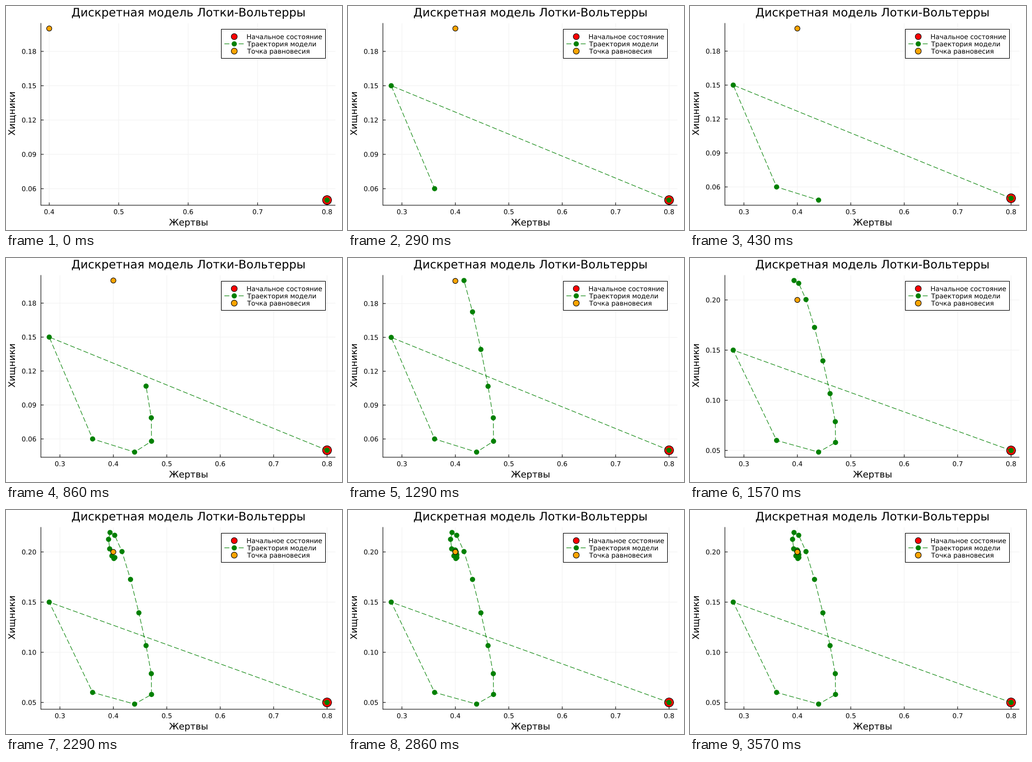
Recreate the animation shown at these times as a matplotlib script. Size 600 px wide and 400 px high, loop 8 s.

```python
import numpy as np
import matplotlib.pyplot as plt
from matplotlib.animation import FuncAnimation
from matplotlib.patches import Circle, PathPatch, Rectangle
from matplotlib.textpath import TextPath
from matplotlib.transforms import Affine2D

W, H, DPI = 600, 400, 100
PX = 72 / DPI                      # one pixel in points
LEFT, RIGHT, TOP, BOTTOM = 62.3, 588.2, 31.0, 355.8
MID = (LEFT + RIGHT) / 2
SMALL, MEDIUM, LARGE = 11.85, 16.3, 20.74
STEPS, INTERVAL, LOOP = 25, 20, 8000
A, B, C, D = 2, 1, 1, 5            # growth, predation, decline, feeding
REST = (0.4, 0.2)                  # equilibrium
GRID = '#f2f2f2'

fig = plt.figure(figsize=(W / DPI, H / DPI), dpi=DPI, facecolor='white')
ax = fig.add_axes([0, 0, 1, 1])
ax.set_xlim(0, W)
ax.set_ylim(H, 0)
ax.axis('off')


def line(xs, ys, color='black', z=1, dashed=False):
    style = (0, (8.8, 4)) if dashed else '-'
    return ax.plot(xs, ys, color=color, lw=PX, ls=style, zorder=z,
                   snap=False, solid_capstyle='butt')[0]


def dot(x, y, r, color, edge=True, z=4):
    return ax.add_patch(Circle((x, y), r, fc=color, ec='black',
                               lw=PX if edge else 0, zorder=z))


def label(s, x, y, size, align=0.5, angle=0):
    """Text on baseline y; align is the fraction of its inked width left of x."""
    path = TextPath((0, 0), s, size=size, prop={'family': 'DejaVu Sans'})
    box = path.get_extents()
    move = (Affine2D().translate(-box.x0 - align * box.width, 0)
            .scale(1, -1).rotate_deg(-angle).translate(x, y))
    return ax.add_patch(PathPatch(move.transform_path(path), fc='black',
                                  lw=0, zorder=6))


def orbit():
    x, y = 0.8, 0.05
    points = [(x, y)]
    for _ in range(STEPS):
        x, y = A * x * (1 - x) - B * x * y, -C * y + D * x * y
        points.append((x, y))
    return np.array(points)


def scale(values, start, end):
    """Map values to pixels with a 3% margin on both sides."""
    lo, hi = min(values), max(values)
    pad = 0.03 * (hi - lo)
    lo, hi = lo - pad, hi + pad
    return (lambda v: start + (v - lo) / (hi - lo) * (end - start)), lo, hi


def ticks(lo, hi, step):
    first, last = int(np.ceil(lo / step)), int(np.floor(hi / step))
    return [k * step for k in range(first, last + 1)]


def draw_stage(points):
    xs, ys = points.T
    to_x, x_lo, x_hi = scale([*xs, REST[0]], LEFT, RIGHT)
    to_y, y_lo, y_hi = scale([*ys, REST[1]], BOTTOM, TOP)
    parts = []
    for v in ticks(x_lo, x_hi, 0.1):
        x = to_x(v)
        parts += [line([x, x], [TOP, BOTTOM], GRID, 0),
                  line([x, x], [BOTTOM - 5, BOTTOM]),
                  label(f'{v:.1f}', x, 371.7, SMALL)]
    for v in ticks(y_lo, y_hi, 0.05 if y_hi > 0.21 else 0.03):
        y = to_y(v)
        parts += [line([LEFT, RIGHT], [y, y], GRID, 0),
                  line([LEFT, LEFT + 5], [y, y]),
                  label(f'{v:.2f}', 28.7, y + 4.4, SMALL, 0)]
    px, py = to_x(xs), to_y(ys)
    parts.append(dot(px[0], py[0], 8, 'red', z=2))
    parts.append(line(px, py, 'green', 3, dashed=True))
    parts += [dot(x, y, 4.6, 'green', False) for x, y in zip(px, py)]
    parts.append(dot(to_x(REST[0]), to_y(REST[1]), 4.6, 'orange', z=5))
    return parts


def draw_frame():
    line([LEFT, LEFT], [TOP - 0.5, BOTTOM + 0.5])
    line([LEFT, RIGHT], [BOTTOM, BOTTOM])
    label('Дискретная модель Лотки-Вольтерры', MID + 0.2, 18.6, LARGE)
    label('Жертвы', MID + 0.2, 392, MEDIUM)
    label('Хищники', 16, 192.4, MEDIUM, angle=90)

    ax.add_patch(Rectangle((384.5, 41.5), 186, 52, fc='white', ec='black',
                           lw=PX, zorder=2, snap=False))
    line([390, 424.6], [67.6, 67.6], 'green', 3, dashed=True)
    rows = [('Начальное состояние', 'red', 5.3),
            ('Траектория модели', 'green', 4.6),
            ('Точка равновесия', 'orange', 5.3)]
    for k, (text, color, r) in enumerate(rows):
        y = 54.7 + 12.95 * k
        dot(407.6, y, r, color, color != 'green')
        label(text, 430.6, y + 4.4, SMALL, 0)


draw_frame()
path = orbit()
stages = [draw_stage(path[:n + 1]) for n in range(STEPS + 1)]


def update(i):
    # seven steps a second, then hold
    n = min(int((i * INTERVAL + 15) * 7 / 1000), STEPS)
    for k, parts in enumerate(stages):
        for part in parts:
            part.set_visible(k == n)
    return []


anim = FuncAnimation(fig, update, frames=LOOP // INTERVAL, interval=INTERVAL,
                     repeat=True, repeat_delay=0, blit=False)
plt.show()
```
